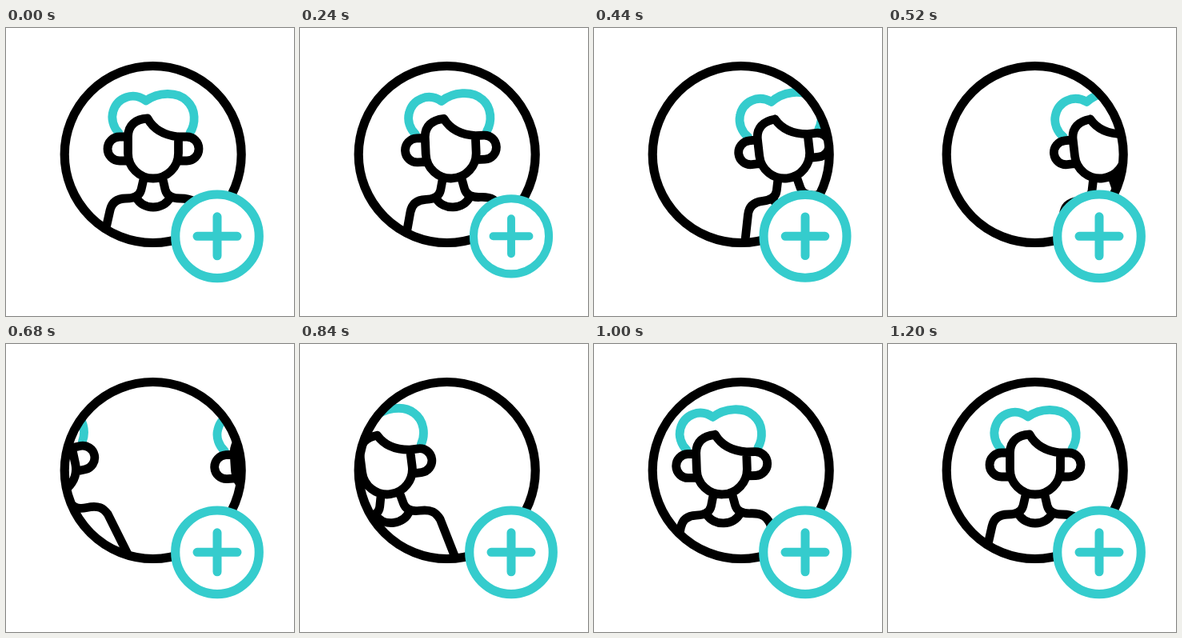
Recreate the animation shown at these times as an HTML page with a canvas. Size 360 px wide and 360 px high, loop 1.48 s.

```html
<!DOCTYPE html>
<html lang="en">
<head>
<meta charset="utf-8">
<title>Add user</title>
<style>
  html, body { margin: 0; width: 100%; height: 100%; overflow: hidden; background: #fff; }
  canvas { display: block; width: 360px; height: 360px; }
</style>
</head>
<body>
<canvas id="stage"></canvas>
<script>
const LOOP = 1480, STEP = 40;
const BLACK = '#000', TEAL = '#35cccd';
const LEAVE_START = 160, ARRIVE_END = 1187;
const SPEED = 0.334, RAMP = 240; // px per ms, ms of acceleration or braking
const HEAD = { x: 184, y: 151 };
const RING = { x: 183.7, y: 158, r: 110.5 };
const BADGE = { x: 264, y: 260.3, r: 52.3 };

const canvas = document.getElementById('stage');
const ctx = canvas.getContext('2d');
const ratio = window.devicePixelRatio || 1;
canvas.width = canvas.height = 360 * ratio;

const hair = new Path2D(
  'M141 131C134 124 131 113 134 104C139 87 159 79 175 91' +
  'C190 80 214 79 226 91C238 102 237 120 230 131');

const person = new Path2D(
  // face and fringe
  'M177 113C162 114 152.5 121 152.5 136V156.5A31.5 31.5 0 0 0 215.5 156.5V136' +
  'C197 134 184 126 177 113' +
  // ears
  'M152.5 136H142A15 15 0 0 0 142 166H152.5' +
  'M215.5 136H226A15 15 0 0 1 226 166H215.5' +
  // neck, shoulders and collar
  'M172 189L169 202C167 210 160 213 150 213C138 213 132 219 130 228L116 290' +
  'M196 189L199 202C201 210 208 213 218 213C233 213 238 218 242 227L258 290' +
  'M163 212C171 228 197 228 205 212');

const progress = (t, from, to) => Math.min(1, Math.max(0, (t - from) / (to - from)));
const smooth = p => p * p * (3 - 2 * p);

// Distance covered after a time, speeding up during the ramp and then steady.
function travel(ms) {
  const t = Math.max(0, ms);
  return SPEED * (t < RAMP ? t * t / (2 * RAMP) : t - RAMP / 2);
}

function stroke(path, color, width) {
  ctx.strokeStyle = color;
  ctx.lineWidth = width;
  ctx.stroke(path);
}

function circle(x, y, r) {
  const path = new Path2D();
  path.arc(x, y, r, 0, Math.PI * 2);
  return path;
}

function drawPerson(shift, degrees) {
  ctx.save();
  ctx.translate(HEAD.x + shift, HEAD.y);
  ctx.rotate(degrees * Math.PI / 180);
  ctx.translate(-HEAD.x, -HEAD.y);
  stroke(hair, TEAL, 10.8);
  stroke(person, BLACK, 10.8);
  ctx.restore();
}

function drawBadge(scale) {
  ctx.save();
  ctx.translate(BADGE.x, BADGE.y);
  ctx.scale(scale, scale);
  const rim = circle(0, 0, BADGE.r);
  ctx.fillStyle = '#fff';
  ctx.fill(rim);
  stroke(rim, TEAL, 11.2);
  stroke(new Path2D('M-25 0H25M0 -24.5V24.5'), TEAL, 11);
  ctx.restore();
}

function draw(t) {
  ctx.setTransform(ratio, 0, 0, ratio, 0, 0);
  ctx.fillStyle = '#fff';
  ctx.fillRect(0, 0, 360, 360);
  ctx.lineCap = ctx.lineJoin = 'round';

  const leaveTilt = -6.6 * Math.sin(Math.PI * progress(t, LEAVE_START, 800));
  const arriveTilt = -13.7 * (1 - smooth(progress(t, 560, 1140)));

  ctx.save();
  ctx.clip(circle(RING.x, RING.y, RING.r));
  if (t < ARRIVE_END) drawPerson(travel(t - LEAVE_START), leaveTilt);
  if (t > LEAVE_START) drawPerson(-travel(ARRIVE_END - t), arriveTilt);
  ctx.restore();
  stroke(circle(RING.x, RING.y, RING.r), BLACK, 11.2);

  const dip = (1 - Math.cos(2 * Math.PI * progress(t, 0, 480))) / 2;
  drawBadge(1 - 0.1 * dip);
}

const start = performance.now();
function frame() {
  const t = (performance.now() - start) % LOOP;
  draw(Math.floor(t / STEP) * STEP);
  requestAnimationFrame(frame);
}
frame();
</script>
</body>
</html>
```
